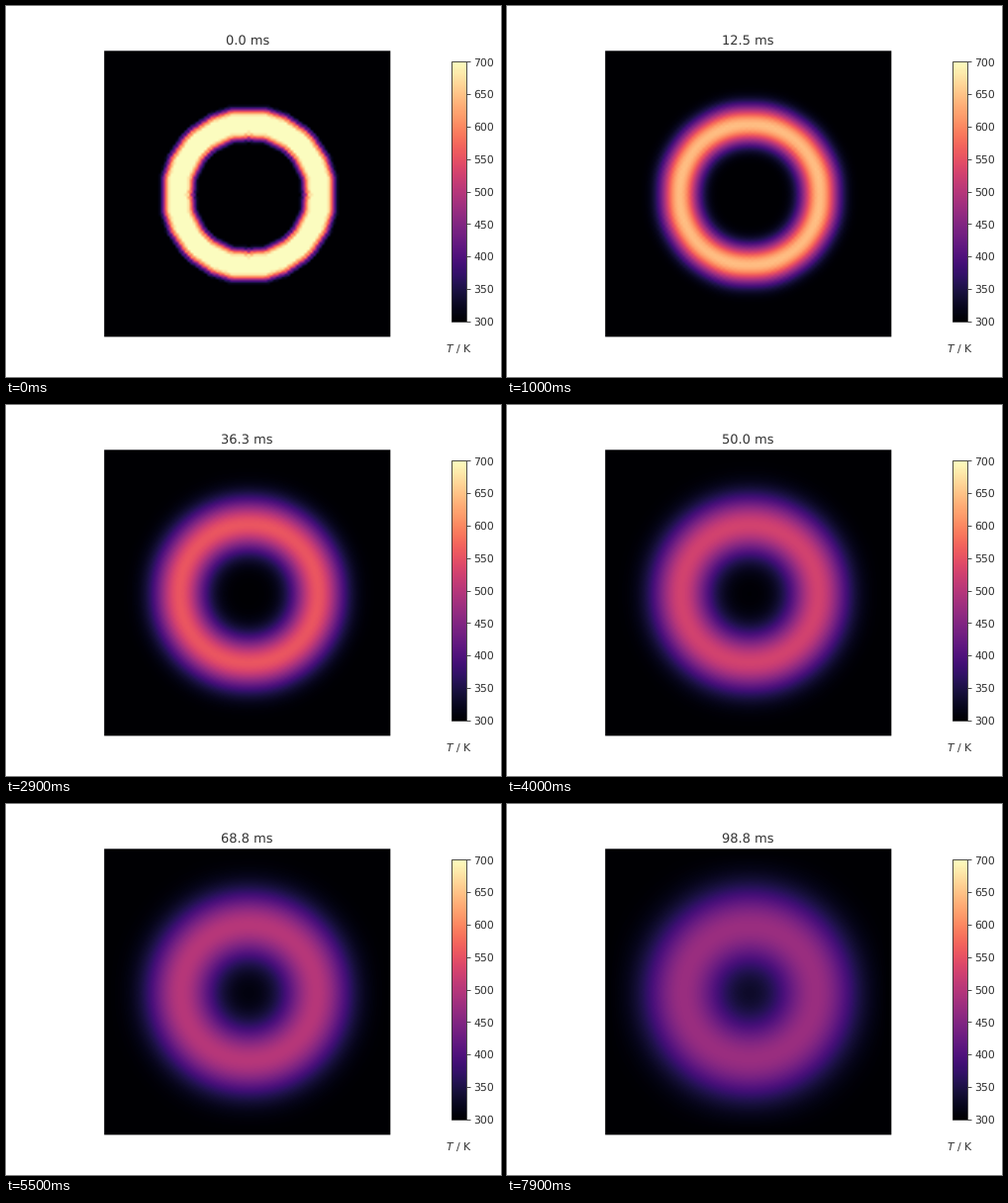
A matplotlib script for the animation above (8 s loop, 500 by 375 pixels).

```python
import numpy as np
import matplotlib.pyplot as plt
from matplotlib.animation import FuncAnimation
from matplotlib.patches import Rectangle
from matplotlib.transforms import Bbox, TransformedBbox

# Plate size and grid spacing (mm), thermal diffusivity (mm2/s)
SIZE, DX, D = 10, 0.1, 4
T_COOL, T_HOT = 300, 700
R_IN, R_OUT = 20, 30  # ring radii in cells
FRAMES, STEPS_PER_FRAME, INTERVAL = 80, 2, 100
W, H = 500, 375
INK = "0.2"

n = int(SIZE / DX)
dx2 = DX**2
dt = dx2 * dx2 / (2 * D * (dx2 + dx2))

plt.rcParams.update({
    "text.color": INK, "axes.labelcolor": INK, "axes.edgecolor": INK,
    "ytick.color": INK, "text.hinting": "none",
})


def ring():
    i, j = np.indices((n, n)) - n // 2
    p2 = i**2 + j**2
    hot = (R_IN**2 < p2) & (p2 < R_OUT**2)
    return np.where(hot, float(T_HOT), float(T_COOL))


def step(u):
    """Forward-difference in time, central-difference in space."""
    new = u.copy()
    mid = u[1:-1, 1:-1]
    lap = (u[2:, 1:-1] + u[:-2, 1:-1] + u[1:-1, 2:] + u[1:-1, :-2] - 4 * mid) / dx2
    new[1:-1, 1:-1] = mid + D * dt * lap
    return new


def solve():
    u = ring()
    states = []
    for _ in range(FRAMES):
        for _ in range(STEPS_PER_FRAME):
            u = step(u)
        states.append(u)
    return states


def fig_box(x0, y0, x1, y1):
    """Box in figure fractions from pixels measured from the top left."""
    return Bbox.from_extents(x0 / W, 1 - y1 / H, x1 / W, 1 - y0 / H)


states = solve()

fig = plt.figure(figsize=(6.4, 4.8), dpi=W / 6.4)
fig.subplots_adjust(right=0.85)
ax = fig.add_subplot()
ax.set_axis_off()
im = ax.imshow(states[0], cmap="magma", vmin=T_COOL, vmax=T_HOT,
               interpolation="bilinear")
title = ax.set_title("")

# Cold plate with soft edges, the field drawn just inside it
plate = fig_box(99.2, 45.3, 388.3, 334.4)
fig.add_artist(Rectangle(plate.p0, plate.width, plate.height, lw=0, fc=im.cmap(0),
                         snap=False, transform=fig.transFigure, zorder=-1))
im.set_clip_box(TransformedBbox(fig_box(100, 46, 388, 333), fig.transFigure))

cbar_ax = fig.add_axes([0.9, 0.15, 0.03, 0.7])
cbar_ax.set_xlabel("$T$ / K", labelpad=20)
fig.colorbar(im, cax=cbar_ax)


def animate(k):
    im.set_data(states[k])
    title.set_text(f"{k * STEPS_PER_FRAME * dt * 1000:.1f} ms")
    return im, title


anim = FuncAnimation(fig, animate, frames=FRAMES, interval=INTERVAL,
                     repeat=True, repeat_delay=0)
plt.show()
```
